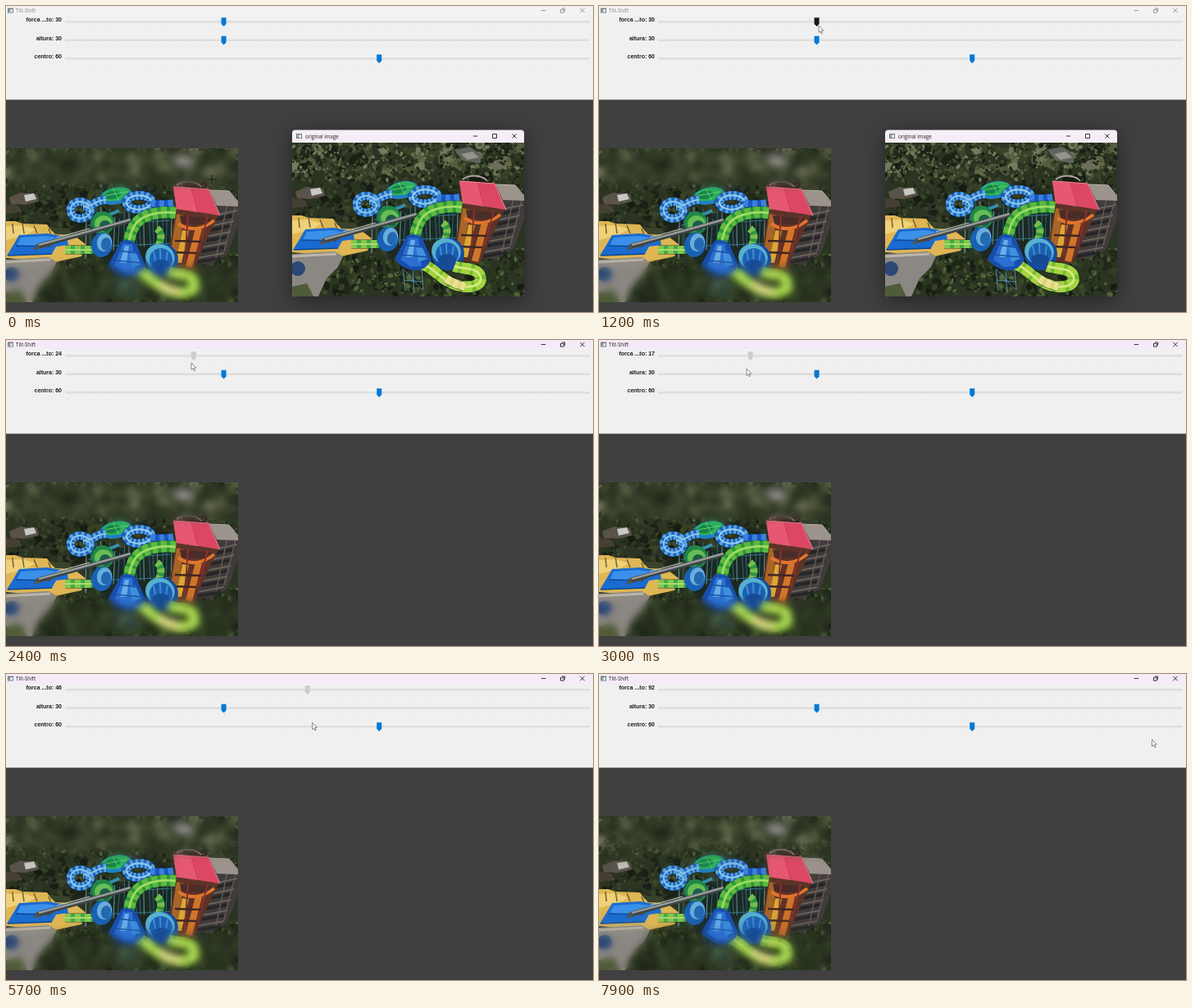
Write an HTML page with a canvas that moves like this. It is 716x374 px and loops after 8 s.

```html
<!DOCTYPE html>
<html lang="pt">
<head>
<meta charset="utf-8">
<title>Tilt-Shift</title>
<style>
html, body { margin: 0; width: 100%; height: 100%; overflow: hidden; background: #404040; }
canvas { display: block; }
</style>
</head>
<body>
<canvas id="stage" width="716" height="374"></canvas>
<script>
const LOOP = 8000, STEP = 100, W = 283, H = 188;
const ctx = document.getElementById('stage').getContext('2d');

function layer(w, h) {
  const c = document.createElement('canvas');
  c.width = w;
  c.height = h;
  return c.getContext('2d');
}

function seeded(seed) {
  return () => {
    seed = (seed + 0x6D2B79F5) | 0;
    let n = Math.imul(seed ^ (seed >>> 15), 1 | seed);
    n = (n + Math.imul(n ^ (n >>> 7), 61 | n)) ^ n;
    return ((n ^ (n >>> 14)) >>> 0) / 4294967296;
  };
}

// keys: [time, value, value...]
function at(keys, t) {
  let i = 1;
  while (i < keys.length - 1 && keys[i][0] < t) i++;
  const a = keys[i - 1], b = keys[i];
  const k = Math.min(1, Math.max(0, (t - a[0]) / (b[0] - a[0])));
  return a.slice(1).map((v, n) => v + (b[n + 1] - v) * k);
}

/* ---------- park picture ---------- */

function paintPark(g) {
  const rnd = seeded(17);
  const fill = (d, c) => { g.fillStyle = c; g.fill(new Path2D(d)); };
  const line = (d, c, w, dash = []) => {
    g.strokeStyle = c;
    g.lineWidth = w;
    g.setLineDash(dash);
    g.stroke(new Path2D(d));
    g.setLineDash([]);
  };
  const disc = (x, y, rx, ry, c, turn = 0) => {
    g.fillStyle = c;
    g.beginPath();
    g.ellipse(x, y, rx, ry, turn, 0, 7);
    g.fill();
  };
  const tube = (d, w, base, stripe, dash, shine) => {
    line(d, 'rgba(8,22,40,.5)', w + 1.5);
    line(d, base, w);
    line(d, stripe, w, dash);
    if (shine) line(d, shine, w * .2);
  };
  const leaves = (n, x, y, w, h, tones, size) => {
    for (let i = 0; i < n; i++) {
      const r = size * (.4 + rnd());
      disc(x + rnd() * w, y + rnd() * h, r, r * (.5 + rnd() * .4), tones[rnd() * tones.length | 0], rnd() * 3);
    }
  };

  const deep = ['#161c12', '#20281a', '#2c3722', '#1a2116', '#364127'];
  const sunny = ['#4b5437', '#626b49', '#3a4429', '#272f1e', '#737a5c', '#535c3c'];
  g.fillStyle = '#2b3422';
  g.fillRect(0, 0, W, H);
  leaves(60, 0, 0, W, 40, sunny, 8);
  leaves(26, 0, 0, W, 50, deep, 10);
  leaves(420, 0, 0, W, 46, sunny, 2.4);
  leaves(240, 0, 0, W, 50, deep, 2.2);
  leaves(240, 0, 46, W, 55, deep, 4.5);
  leaves(120, 0, 44, W, 44, ['#3b4729', '#4a5634', '#2e3921'], 2.2);
  leaves(200, 30, 128, 253, 60, deep, 5);
  leaves(320, 30, 128, 253, 60, ['#3d4f29', '#52653a', '#2b3b1f', '#1e2817'], 2.6);

  // clearings and houses
  fill('M198 9L216 5 232 15 228 25 208 22Z', '#62645c');
  fill('M206 14L220 11 228 18 214 21Z', '#96958d');
  fill('M104 8L112 6 118 12 110 15Z', '#767a5c');
  fill('M238 26L252 24 262 31 246 34Z', '#6d6c58');
  fill('M4 60L18 54 38 56 40 65 22 69 6 68Z', '#5a5349');
  fill('M22 57L34 55 37 62 24 65Z', '#c8c8c4');
  fill('M0 68L16 70 20 78 0 80Z', '#463f34');

  // ground, road, pool
  fill('M0 89L12 89 20 92 50 93 56 101 80 104 98 118 92 132 60 139 0 134Z', '#dfb654');
  fill('M0 95L20 94 36 99 24 106 0 112Z', '#f0d078');
  line('M20 91L22 104M34 94L38 104M52 98L55 106M8 92L9 104', '#6e6132', 1.5);
  fill('M52 96L76 98 82 106 60 105Z', '#39432a');
  fill('M0 136L52 133 62 139 56 152 42 166 32 188 0 188Z', '#8b8782');
  line('M0 139L54 136', '#bdb6aa', 3);
  fill('M0 176L18 172 26 188 0 188Z', '#4f5c39');
  disc(7, 154, 9, 9, '#2b4874');
  fill('M1 131L9 118 16 106 50 104 74 108 76 118 61 120 56 129 30 130Z', '#1a6bd0');
  fill('M18 109L48 107 68 110 40 120 13 119Z', '#3b91ea');
  line('M2 131L30 130 56 129M12 119L54 120', '#0c4691', 1.4);
  line('M36 119L64 111M34 123L58 117', '#5f513b', 2.5);

  // steel frame
  fill('M100 82L208 76 206 140 118 142Z', 'rgba(24,38,34,.7)');
  for (let i = 0; i < 19; i++) {
    const x = 98 + i * 5.8, y = 70 + rnd() * 18;
    line(`M${x} ${y}L${x + rnd() * 8 - 4} ${y + 34 + rnd() * 22}`, i % 3 ? '#27708f' : '#6fa3b0', .9);
  }
  line('M100 94L200 88M110 120L204 116', '#37809b', .9);

  // upper tubes
  disc(134, 58, 20, 10.5, '#1f7fc4', -.2);
  disc(134, 56, 17, 8, '#2eb25c', -.2);
  disc(130, 57, 10, 5, '#178348', -.2);
  line('M120 58L148 53M130 49L138 64', '#62cf78', 1);
  const blue = ['#1f62b8', '#5aa6e2', [3, 3]];
  tube('M122 63C112 63 108 68 102 70C90 60 77 67 79 77C81 89 98 87 102 80C105 74 100 71 94 71', 10, ...blue, '#8cc6ee');
  tube('M204 67C190 69 181 68 174 66', 9, '#1757c4', '#3c7fdd', [6, 5]);
  tube('M177 64C174 55 150 55 147 65C146 76 169 78 176 69', 10.5, ...blue, '#94cdf2');
  line('M112 78C114 86 126 82 138 76', '#3590ae', 4);

  // middle slides
  disc(118, 91, 14, 14, '#208745');
  disc(119, 92, 11, 10, '#66bd55');
  disc(121, 95, 7, 7, '#1e5d4c');
  tube('M72 124L106 124', 10, '#43a846', '#83c84e', [7, 5], '#a8dc70');
  disc(117, 118, 13, 15, '#1961b4', .2);
  disc(120, 115, 9, 11, '#68aedd', .2);
  disc(122, 117, 6, 8, '#2468b0', .2);
  line('M40 119L102 102 152 88', '#3b4442', 5.5);
  line('M40 118L102 101 152 87', '#979c9b', 2.8);
  line('M62 109L102 98', '#c6c9c6', 1);

  // tower
  fill('M254 70L283 66 283 94 270 130 248 143 226 140Z', '#413c3b');
  for (let i = 0; i < 5; i++) {
    const y = 80 + i * 13;
    line(`M${253 - i * 5} ${y + 2}L${282 - i * 4} ${y - 4}`, '#746b64', 1.4);
    line(`M${253 - i * 5} ${y + 7}L${278 - i * 4} ${y + 2}`, '#262528', 4);
  }
  line('M270 68L256 134M280 70L266 126', '#665e59', 1.3);
  fill('M248 51L272 52 283 66 283 71 257 70Z', '#9c948c');
  line('M248 51L272 52 283 65', '#beb7ae', 1);
  fill('M207 74L259 82 240 122 229 148 196 143 202 106Z', '#5d3326');
  fill('M208 80L217 82 208 139 199 139Z', '#a96527');
  fill('M215 100L223 101 214 140 207 140Z', '#d9a833');
  fill('M231 98L239 99 227 146 219 144Z', '#d1752a');
  line('M210 92C224 102 240 99 254 88', '#e0752e', 4);
  fill('M212 82L252 86 244 93 214 92Z', '#4a2c28');
  line('M222 82L218 138M246 83L234 128', '#8d2f2d', 2);
  line('M206 113L238 114M203 127L232 128', '#402623', 2.5);
  line('M208 45C217 38 233 40 238 47', '#b9aeac', 1.6);
  fill('M204 47L247 50 261 82 208 74Z', '#dc4763');
  fill('M204 47L226 48 234 78 208 74Z', '#e65872');
  line('M204 47L247 50 261 82', '#ee8896', 1);
  line('M226 49L234 78', '#c43a53', .8);

  // front slides
  tube('M184 98C192 104 189 113 184 124', 9, '#2f963f', '#79bd4c', [5, 4]);
  tube('M207 79C186 76 164 82 157 94C152 101 151 109 149 118', 14, '#2b983a', '#5fb840', [7, 4], '#9ddd62');
  disc(190, 136, 20, 20, '#164a9c');
  disc(188, 133, 18, 16, '#58b0cf', .3);
  disc(189, 136, 14, 14, '#1b5fb4', .3);
  line('M180 126L184 146M188 123L189 148M197 126L194 146', '#3f8fca', 2);
  disc(189, 143, 11, 7, '#174a95');
  tube('M156 148C172 150 180 169 204 175C222 179 234 172 229 162C224 152 208 155 198 151', 13.5, '#74ba30', '#a4d443', [11, 4], '#d8ea80');
  tube('M188 166C194 171 203 174 211 176', 10, '#ddd573', '#e9e294', [6, 4]);
  fill('M140 114Q149 109 159 117L170 143Q162 158 147 156Q132 153 125 142Z', '#184eae');
  fill('M143 116L154 117 158 151 145 152 132 143Z', '#2c6fd0');
  fill('M145 119L150 119 147 140 139 140Z', '#69aee6');
  fill('M151 128L158 126 165 142 154 146Z', '#3f8fdc');
  line('M137 125L160 128M132 137L166 140', '#15509f', 1.4);
  line('M135 154L138 181M147 157L149 184M158 154L160 180M136 168L159 170M136 155L158 179', '#5b96b2', .9);
}

const sharp = layer(W, H), soft = layer(W, H), band = layer(W, H);
paintPark(sharp);
soft.drawImage(sharp.canvas, 0, 0);
soft.filter = 'blur(4px)';
soft.drawImage(sharp.canvas, 0, 0);

// sharp band with tanh edges; force sets how wide the edges are
function drawTiltShift(x, y, force) {
  const d = Math.max(.6, force * .2), stops = 60;
  const mask = band.createLinearGradient(0, 0, 0, H);
  for (let i = 0; i <= stops; i++) {
    const row = i / stops * H;
    const a = (Math.tanh((row - 46) / d) - Math.tanh((row - 143) / d)) / 2;
    mask.addColorStop(i / stops, `rgba(0,0,0,${a.toFixed(3)})`);
  }
  band.globalCompositeOperation = 'copy';
  band.drawImage(sharp.canvas, 0, 0);
  band.globalCompositeOperation = 'destination-in';
  band.fillStyle = mask;
  band.fillRect(0, 0, W, H);
  ctx.drawImage(soft.canvas, x, y);
  ctx.drawImage(band.canvas, x, y);
}

/* ---------- windows ---------- */

function box(x, y, w, h, c) {
  ctx.fillStyle = c;
  ctx.fillRect(x, y, w, h);
}

function poly(points, color, edge) {
  ctx.beginPath();
  points.forEach(([x, y]) => ctx.lineTo(x, y));
  ctx.closePath();
  ctx.fillStyle = color;
  ctx.fill();
  if (edge) {
    ctx.strokeStyle = edge;
    ctx.lineWidth = .8;
    ctx.stroke();
  }
}

function label(text, x, y, font, color, align = 'left') {
  ctx.font = font;
  ctx.fillStyle = color;
  ctx.textAlign = align;
  ctx.fillText(text, x, y);
}

function appIcon(x, y, s) {
  box(x, y, s, s - 1, '#777e84');
  box(x + 1, y + 1.5, s - 2, s - 3.5, '#fafafa');
  box(x + 1, y + 1.5, s / 2 - 1, s - 3.5, '#7fa5a3');
}

function buttons(xs, y, color, r, restore) {
  const [a, b, c] = xs;
  ctx.strokeStyle = color;
  ctx.lineWidth = .9;
  ctx.beginPath();
  ctx.moveTo(a - r, y);
  ctx.lineTo(a + r, y);
  if (restore) {
    ctx.rect(b - 2.5, y - 1.2, 3.8, 3.8);
    ctx.moveTo(b - 1, y - 2.6);
    ctx.lineTo(b + 2.6, y - 2.6);
    ctx.lineTo(b + 2.6, y + 1.2);
  } else {
    ctx.rect(b - 2.5, y - 2.5, 5, 5);
  }
  ctx.moveTo(c - r, y - r);
  ctx.lineTo(c + r, y + r);
  ctx.moveTo(c + r, y - r);
  ctx.lineTo(c - r, y + r);
  ctx.stroke();
}

const UI = '"Open Sans", "Noto Sans", sans-serif';
const BOLD = 'bold 7px "Liberation Sans", Arial, sans-serif';
const slotX = v => 76 + v * 6.32;

function slider(name, v, y, color) {
  label(`${name}: ${Math.floor(v)}`, 68, y + .4, BOLD, '#1c1c1c', 'right');
  box(72, y - 1, 640, 2.5, '#dedede');
  for (let i = 0; i <= 100; i++) box(Math.round(slotX(i)), y + 8, 1, 1, '#dadada');
  if (!color) return;
  const x = slotX(v);
  poly([[x - 3, y - 4.7], [x + 3, y - 4.7], [x + 3, y + 3], [x, y + 6], [x - 3, y + 3]], color);
}

function pictureWindow() {
  ctx.save();
  ctx.shadowColor = 'rgba(0,0,0,.45)';
  ctx.shadowBlur = 26;
  ctx.shadowOffsetY = 5;
  ctx.fillStyle = '#f5edf7';
  ctx.beginPath();
  ctx.roundRect(349, 151.5, W, 203.5, 4);
  ctx.fill();
  ctx.shadowColor = 'transparent';
  ctx.clip();
  ctx.drawImage(sharp.canvas, 349, 167);
  ctx.restore();
  appIcon(354, 156, 7);
  label('original image', 365, 161.5, '6.2px ' + UI, '#222');
  buttons([572.5, 596, 620], 159, '#222', 2.6, false);
}

function pointer(x, y) {
  if (y > 115) {
    box(x - 6, y - .5, 12, 1, '#16180f');
    box(x - .5, y - 6, 1, 12, '#16180f');
    return;
  }
  const shape = [[0, 0], [0, 8.4], [1.9, 6.7], [3.3, 9.8], [4.6, 9.2], [3.2, 6.2], [5.8, 6]];
  poly(shape.map(([a, b]) => [x + a, y + b]), '#fff', '#6a6a6a');
}

/* ---------- timeline ---------- */

const force = [[0, 30], [1900, 30], [3000, 17.2], [4500, 5.05], [4700, 5.05], [5400, 34],
  [6300, 70.5], [6700, 77.9], [7200, 83], [7900, 92.2]];
const mouse = [[0, 251, 212], [300, 252, 205], [800, 264, 100], [1000, 268, 36], [1200, 268, 24],
  [1700, 264.5, 22], [1900, 264.5, 22], [3000, 180, 35], [4500, 108, 35], [4700, 108, 35],
  [5400, 296, 52], [6300, 529, 74], [6700, 573, 77], [7200, 614, 79], [7900, 674.5, 80]];
const ACTIVATE = 1400, FOCUS_END = 2100;

function draw(t) {
  const active = t >= ACTIVATE;
  const [v] = at(force, t);
  const [mx, my] = at(mouse, t);

  box(0, 0, 716, 374, '#404040');
  box(0, 12, 716, 102.5, '#f0f0f0');

  let thumb = '#0078d7';
  if (active) thumb = t >= 7900 ? null : '#cccccc';
  else if (t >= 1000) thumb = '#171717';
  slider('forca ...to', v, 19, thumb);
  slider('altura', 30, 41.5, '#0078d7');
  slider('centro', 60, 64, '#0078d7');

  if (active && t < FOCUS_END) {
    ctx.strokeStyle = '#b4b4b4';
    ctx.lineWidth = 1;
    ctx.strokeRect(68.5, 12.5, 647, 20);
  }

  box(0, 0, 716, 12, active ? '#f5ebf8' : '#f3f3f3');
  appIcon(2, 2.5, 7);
  label('Tilt-Shift', 12, 8.3, '6.3px ' + UI, active ? '#222' : '#8c8c8c');
  buttons([655.5, 679, 703], 5.5, active ? '#222' : '#8c8c8c', 2.7, true);

  drawTiltShift(0, 174, v);
  if (!active) pictureWindow();
  pointer(mx, my);
}

function tick() {
  const t = performance.now() % LOOP;
  draw(Math.floor(t / STEP) * STEP);
  requestAnimationFrame(tick);
}
tick();
</script>
</body>
</html>
```
